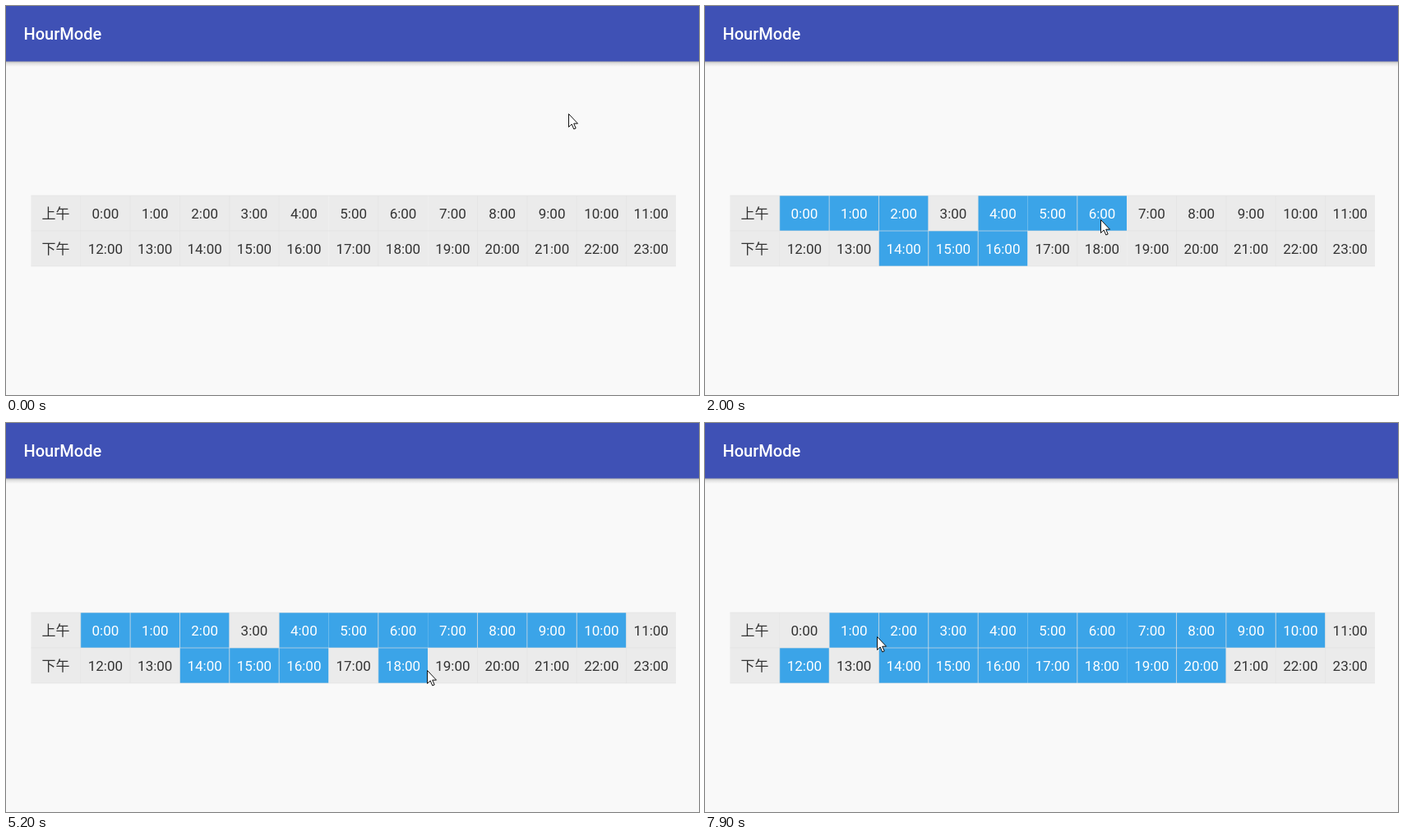
An HTML page for the animation above (8 s loop, 843 by 474 pixels).

```html
<!DOCTYPE html>
<html lang="zh">
<head>
<meta charset="utf-8">
<style>
  html, body { margin: 0; width: 100%; height: 100%; overflow: hidden; background: #f9f9f9; }
  svg { display: block; }
  text { font: 17px Roboto, "Noto Sans CJK SC", "Noto Sans CJK", sans-serif; text-anchor: middle; fill: #333; }
  .title { font-size: 20px; font-weight: 500; text-anchor: start; fill: #fff; }
  .cell { fill: #ebebeb; }
  .on .cell { fill: #3ba4e8; }
  .on text { fill: #fff; }
  .line { stroke: #e1e1e1; opacity: .65; }
</style>
</head>
<body>
<svg width="843" height="474" viewBox="0 0 843 474">
  <defs>
    <linearGradient id="shadow" x2="0" y2="1">
      <stop offset="0" stop-color="#000" stop-opacity=".32"/>
      <stop offset=".4" stop-color="#000" stop-opacity=".1"/>
      <stop offset="1" stop-color="#000" stop-opacity="0"/>
    </linearGradient>
  </defs>
  <rect width="843" height="474" fill="#f9f9f9"/>
  <rect y="67" width="843" height="7" fill="url(#shadow)"/>
  <rect width="843" height="67.5" fill="#3f51b5"/>
  <text class="title" x="21.5" y="41">HourMode</text>
  <g id="table"></g>
  <path id="cursor" d="M.5 .5V16.5L4.2 13L6.8 19L9.2 18L6.7 12.2H11.5Z" fill="#fff" stroke="#111"/>
</svg>
<script>
const LOOP = 8000, STEP = 100, SAMPLE = 20;
const LEFT = 30.4, TOP = 231, PITCH = 60.35, ROW = 43, COLS = 13;
const table = document.getElementById('table');
const cursor = document.getElementById('cursor');

function add(parent, tag, attrs, text = '') {
  const node = document.createElementNS('http://www.w3.org/2000/svg', tag);
  for (const key in attrs) node.setAttribute(key, attrs[key]);
  node.textContent = text;
  return parent.appendChild(node);
}

const colX = col => LEFT + PITCH * col;
const rowY = row => TOP + ROW * row;
const addLine = (x1, y1, x2, y2) => add(table, 'line', { class: 'line', x1, y1, x2, y2 });

function addCell(col, row, label) {
  const group = add(table, 'g', {});
  add(group, 'rect', { class: 'cell', x: colX(col), y: rowY(row), width: PITCH, height: ROW });
  add(group, 'text', { x: colX(col + .5), y: rowY(row) + 28.2 }, label);
  return group;
}

['上午', '下午'].forEach((label, row) => addCell(0, row, label));
const hours = Array.from({ length: 24 }, (_, h) =>
  addCell(h % 12 + 1, h < 12 ? 0 : 1, h + ':00'));

for (let row = 0; row <= 2; row++) addLine(colX(0), rowY(row), colX(COLS), rowY(row));
for (let col = 1; col < COLS; col++)
  if (col !== 6 && col !== 8) addLine(colX(col), rowY(0), colX(col), rowY(2));

// A stroke runs from the last position through its points, evenly spaced in time.
const strokes = [];
let last = [684, 131];
function stroke(down, start, end, ...points) {
  strokes.push({ down, start, end, points: [last, ...points] });
  last = points[points.length - 1] || last;
}
const hover = (...args) => stroke(false, ...args);
const drag = (...args) => stroke(true, ...args);
const tap = t => drag(t, t + STEP);

hover(0, 700, [99, 253]);
drag(800, 2200, [235, 253], [245, 284], [337, 283], [410, 255], [480, 255], [490, 290]);
hover(2200, 2600, [590, 264]);
tap(2600);
hover(2900, 3100, [597, 292]);
tap(3100);
tap(3300);
hover(3400, 3700, [598, 264]);
tap(3700);
tap(3900);
hover(4000, 4300, [645, 255]);
drag(4300, 4900, [722, 253], [620, 255], [540, 255]);
hover(4900, 5100, [512, 301]);
hover(5300, 5700, [591, 298]);
drag(5900, 7100, [441, 278], [291, 255], [152, 266], [122, 288]);
hover(7200, 7500, [122, 254]);
tap(7500);
hover(7600, 7900, [209, 260]);

function along({ start, end, points }, t) {
  const pos = Math.min((t - start) / (end - start), 1) * (points.length - 1);
  const i = Math.floor(pos), a = points[i], b = points[i + 1] || a;
  return a.map((v, k) => v + (b[k] - v) * (pos - i));
}

const hourAt = ([x, y]) =>
  Math.floor((x - LEFT) / PITCH) - 1 + 12 * Math.floor((y - TOP) / ROW);

// The first cell of a drag flips; the cells after it take the same state.
function selectionAt(t) {
  const on = Array(24).fill(false);
  for (const s of strokes.filter(s => s.down && s.start <= t)) {
    const state = !on[hourAt(along(s, s.start))];
    for (let u = s.start; u <= Math.min(t, s.end); u += SAMPLE) on[hourAt(along(s, u))] = state;
  }
  return on;
}

function draw(now) {
  const t = Math.floor(now % LOOP / STEP) * STEP;
  const current = strokes.filter(s => s.start <= t).pop();
  const selected = selectionAt(t - STEP); // cells respond one step late
  hours.forEach((cell, h) => cell.setAttribute('class', selected[h] ? 'on' : ''));
  cursor.setAttribute('transform', `translate(${along(current, t).map(Math.round)})`);
  requestAnimationFrame(draw);
}
draw(0);
</script>
</body>
</html>
```
